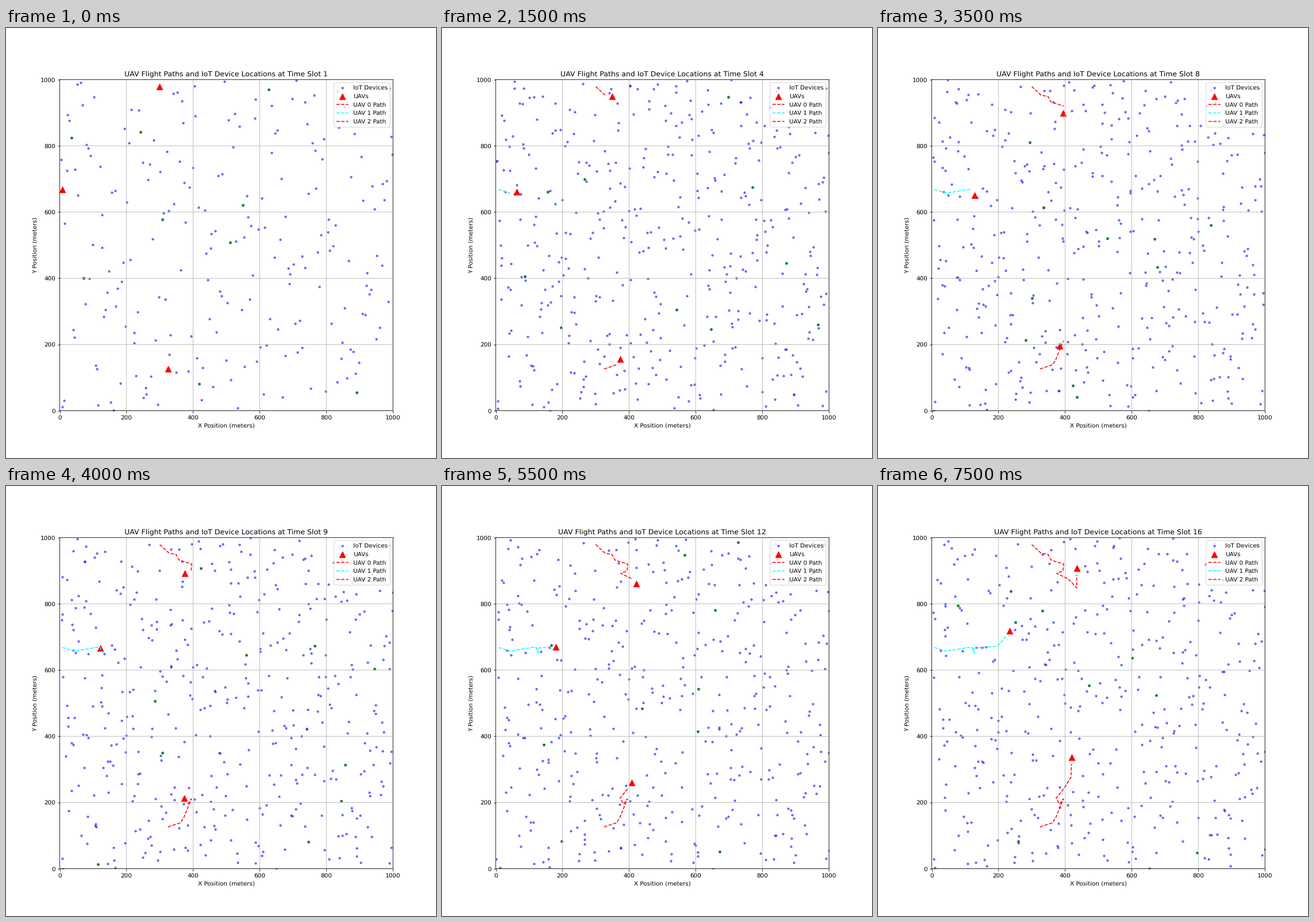
Recreate the animation shown at these times as a matplotlib script. Size 748 by 748 pixels, loop 8 s.

```python
import numpy as np
import matplotlib.pyplot as plt
from matplotlib.animation import FuncAnimation

# Soft, unsnapped lines and unhinted text
plt.rcParams.update({"path.snap": False, "text.hinting": "none"})

SLOTS = 16
SIDE = 1000
FIRST, ADDED = 220, 210  # devices in the first slot, and those that join next
DRIFT = 5                # largest device move per slot, in meters
SERVED = 10              # devices served per slot

# Turning points of each UAV: (time slot, x, y)
TURNS = [
    [(1, 300, 979), (3, 328, 953), (4, 349, 949), (5, 358, 932),
     (7, 396, 920), (8, 394, 899), (9, 375, 892), (11, 410, 875),
     (13, 435, 848), (16, 435, 907)],
    [(1, 8, 668), (3, 44, 657), (7, 120, 670), (8, 129, 651),
     (9, 122, 666), (13, 199, 672), (16, 234, 719)],
    [(1, 325, 126), (3, 363, 139), (4, 373, 156), (7, 395, 211),
     (8, 384, 195), (9, 373, 213), (11, 398, 244), (13, 418, 277),
     (16, 420, 336)],
]
COLORS = ["red", "cyan", "red"]


def fly(turns):
    """Position in every slot, at even speed between turning points."""
    t, x, y = np.array(turns).T
    slots = np.arange(1, SLOTS + 1)
    return np.column_stack([np.interp(slots, t, x), np.interp(slots, t, y)])


def scatter_evenly(n):
    """Random points with an even spread along both axes."""
    return np.column_stack([(rng.permutation(n) + rng.random(n)) / n * SIDE
                            for _ in range(2)])


def drift(start):
    """Slow random walk of every device, kept inside the area."""
    track = [start]
    for _ in range(SLOTS - 1):
        step = rng.uniform(-DRIFT, DRIFT, start.shape)
        track.append(np.clip(track[-1] + step, 0, SIDE))
    return np.array(track)


rng = np.random.default_rng(7)
devices = drift(np.vstack([scatter_evenly(FIRST), scatter_evenly(ADDED)]))
served = [rng.choice(FIRST, SERVED, replace=False) for _ in range(SLOTS)]
routes = np.array([fly(turns) for turns in TURNS])

fig, ax = plt.subplots(figsize=(10, 10), dpi=74.8)
dots = ax.scatter([], [], s=10, c="blue", alpha=0.5, label="IoT Devices")
stars = ax.scatter([], [], s=20, c="green", marker="*")
uavs = ax.scatter([], [], s=100, c="red", marker="^", label="UAVs")
paths = [ax.plot([], [], "--", color=c, label=f"UAV {i} Path")[0]
         for i, c in enumerate(COLORS)]

ax.set(xlim=(0, SIDE), ylim=(0, SIDE),
       xlabel="X Position (meters)", ylabel="Y Position (meters)")
ax.grid(True)
ax.legend(loc="upper right")


def update(slot):
    now = devices[slot]
    dots.set_offsets(now if slot else now[:FIRST])
    stars.set_offsets(now[served[slot]])
    uavs.set_offsets(routes[:, slot])
    for path, route in zip(paths, routes):
        path.set_data(*route[:slot].T)  # trails one slot behind the UAV
    ax.set_title("UAV Flight Paths and IoT Device Locations "
                 f"at Time Slot {slot + 1}")
    return [dots, stars, uavs, *paths, ax.title]


anim = FuncAnimation(fig, update, frames=SLOTS, interval=500,
                     init_func=lambda: update(0), repeat=True, repeat_delay=0)
plt.show()
```
